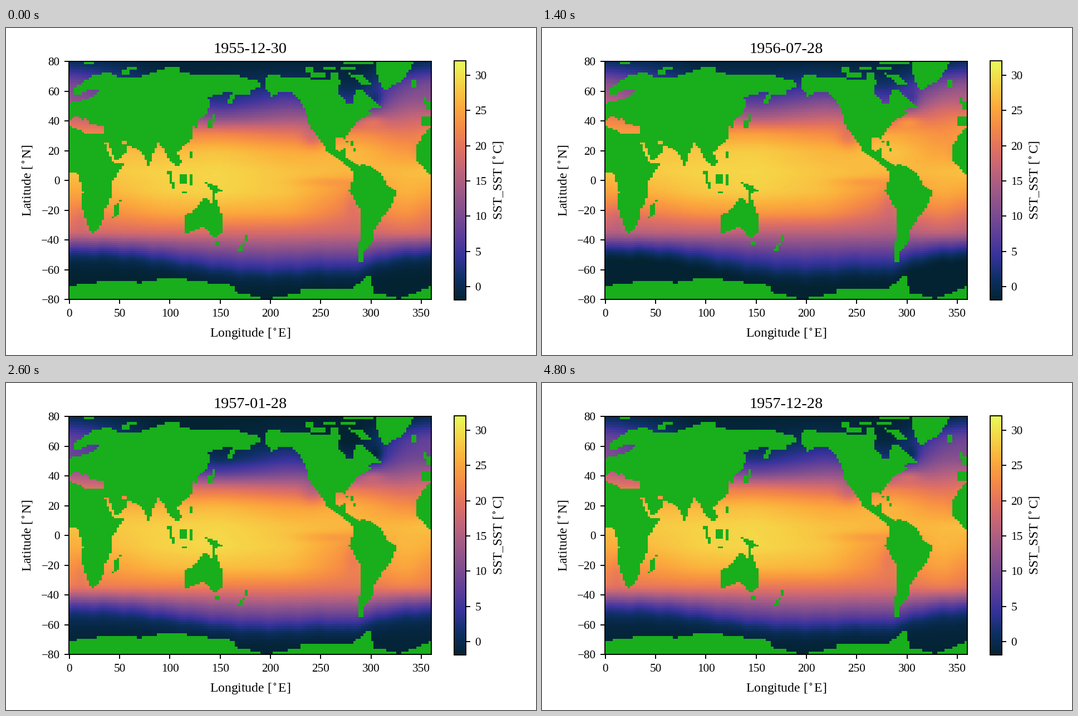
Animation of 952 by 588 pixels, one loop 5000 ms. Source, as a matplotlib script:

```python
import numpy as np
import matplotlib.pyplot as plt
from matplotlib.animation import FuncAnimation
from matplotlib.colors import LinearSegmentedColormap
from matplotlib.path import Path

W, H, DPI = 952, 588, 170
FRAMES, INTERVAL = 25, 200
NX, NY = 144, 120

plt.rcParams.update({
    "font.family": "Liberation Serif", "mathtext.fontset": "stix",
    "font.size": 10, "xtick.labelsize": 9, "ytick.labelsize": 9,
})

THERMAL = ["#032333", "#0d3064", "#35329b", "#5d3e99", "#7e4d8f", "#9e5987",
           "#c16479", "#e17161", "#f68b45", "#fbad3c", "#f6d346", "#e7fa5a"]
cmap = LinearSegmentedColormap.from_list("thermal", THERMAL, 256)
cmap.set_bad("#19ae1c")

# Grid: rows are finer at the equator than at the poles
s = np.linspace(-1, 1, NY + 1)
lon_edges = np.linspace(-0.5, 360, NX + 1)
lat_edges = 80 * (0.8 * s + 0.2 * s**3)
lon = (lon_edges[1:] + lon_edges[:-1]) / 2
lat = (lat_edges[1:] + lat_edges[:-1]) / 2
LON, LAT = np.meshgrid(lon, lat)
STAGE = np.c_[113.9 + 1.806 * LON.ravel(), 274.25 - 2.675 * LAT.ravel()]
land = np.zeros(LON.shape, bool)


def paint(*outline, value=True):
    """Mark the cells inside an outline given in stage pixels."""
    path = Path(np.reshape(outline, (-1, 2)))
    land[path.contains_points(STAGE).reshape(land.shape)] = value


def island(x, y, w, h):
    paint(x, y, x + w, y, x + w, y + h, x, y + h)


def draw_continents():
    # Northern Eurasia
    paint(113, 138, 123, 131, 123, 108, 143, 95, 160, 84, 186, 80, 208, 91,
          228, 91, 264, 80, 290, 70, 312, 70, 312, 78, 352, 86, 410, 84,
          457, 97, 457, 104, 440, 112, 437, 119, 414, 121, 402, 140, 397, 131,
          408, 113, 362, 124, 368, 134, 360, 155, 344, 168, 113, 168)
    # Southern Asia
    paint(113, 160, 344, 166, 345, 179, 340, 182, 333, 171, 333, 200,
          307, 224, 316, 240, 307, 251, 290, 232, 281, 214, 273, 207, 262, 228,
          258, 253, 246, 226, 240, 220, 219, 211, 215, 225, 195, 241, 176, 206,
          113, 190)
    # Africa, both sides of the seam
    paint(113, 172, 177, 186, 178, 207, 193, 243, 213, 244, 190, 277, 187, 312,
          179, 322, 173, 350, 160, 367, 152, 368, 135, 320, 138, 295, 130, 262,
          113, 260)
    paint(766, 176, 750, 192, 735, 215, 735, 233, 757, 261, 766, 262)
    # Australia, New Guinea, Madagascar
    paint(320, 369, 320, 338, 333, 332, 356, 306, 365, 309, 372, 322, 375, 304,
          391, 343, 386, 373, 372, 375, 355, 357, 336, 365)
    paint(358, 278, 378, 283, 387, 293, 373, 300, 373, 319, 369, 292)
    paint(192, 341, 193, 322, 206, 310, 201, 338)
    # North America
    paint(464, 97, 470, 85, 497, 87, 603, 96, 594, 112, 614, 137, 621, 138,
          625, 122, 631, 109, 642, 112, 672, 142, 650, 147, 657, 154, 633, 167,
          610, 195, 614, 207, 605, 198, 591, 198, 591, 216, 602, 222, 604, 216,
          611, 216, 609, 230, 632, 248, 622, 256, 595, 233, 577, 222, 557, 190,
          548, 184, 539, 150, 520, 118, 497, 114, 478, 123, 464, 105)
    # South America
    paint(622, 250, 645, 245, 674, 262, 686, 285, 702, 292, 692, 322, 676, 340,
          660, 366, 660, 380, 640, 408, 643, 421, 631, 421, 638, 355, 636, 326,
          617, 293, 623, 272)
    # Greenland, Baffin Island
    paint(664, 59, 668, 95, 683, 116, 690, 105, 712, 94, 736, 59)
    paint(612, 81, 640, 85, 658, 101, 645, 104)
    # Antarctica
    paint(112, 492, 112, 464, 193, 453, 240, 458, 296, 449, 410, 463, 410, 474,
          465, 488, 528, 477, 530, 470, 618, 470, 655, 443, 659, 476, 708, 487,
          766, 464, 766, 492)


def draw_inland_seas():
    paint(112, 167, 126, 156, 140, 167, 144, 158, 151, 174, 178, 176, 178, 191,
          148, 191, 112, 176, value=False)
    paint(123, 122, 146, 112, 167, 112, 150, 127, 123, 132, value=False)
    paint(177, 207, 184, 207, 196, 238, 212, 240, 193, 243, value=False)
    paint(206, 202, 218, 202, 218, 208, 206, 208, value=False)


def draw_islands():
    # Europe
    island(748, 160, 18, 17)
    island(729, 95, 10, 11)
    island(750, 122, 5, 13)
    island(756, 130, 9, 17)
    island(141, 61, 17, 6)
    island(207, 77, 13, 7)
    island(216, 68, 20, 6)
    # Japan and the Philippines
    island(371, 154, 5, 14)
    island(360, 167, 9, 14)
    island(330, 223, 5, 11)
    # Indonesia
    paint(290, 258, 296, 258, 304, 290, 297, 284)
    island(312, 264, 12, 17)
    island(330, 264, 6, 20)
    island(316, 294, 8, 4)
    # Tasmania and New Zealand
    island(376, 384, 8, 5)
    island(430, 371, 6, 13)
    paint(424, 386, 430, 386, 422, 402, 416, 400)
    # Caribbean
    island(620, 204, 5, 7)
    island(625, 217, 5, 6)
    # Canadian Arctic
    island(605, 60, 54, 5)
    island(540, 71, 10, 11)
    island(549, 79, 26, 9)
    island(570, 69, 20, 6)
    island(584, 79, 13, 13)
    island(600, 69, 28, 6)


def smooth(a, n, axis, mode):
    kernel = np.hanning(n + 2)[1:-1]
    kernel /= kernel.sum()
    pad = [(0, 0), (0, 0)]
    pad[axis] = (n // 2, n // 2)
    return np.apply_along_axis(np.convolve, axis, np.pad(a, pad, mode=mode),
                               kernel, "valid")


def bump(x, y, w, h, change):
    return change * np.exp(-((LON - x) / w)**2 - ((LAT - y) / h)**2)


# Yearly mean temperature: a profile from south to north for some longitudes
KNOT_LAT = [-35, -22, -8, 6, 20, 32, 42, 52, 65, 80]
PROFILES = {
    0: [18.3, 21, 25, 27.5, 27, 22, 18, 12.5, 10.5, 0],
    90: [19, 25, 28.3, 28.8, 27, 21.5, 13, 7, 0, -1.8],
    150: [18.5, 25.5, 29, 29.2, 27.5, 22, 10.5, 3.5, 0, -1.8],
    220: [18.5, 25, 27.5, 27.5, 25.5, 20, 13.5, 8, 1.5, -1.8],
    285: [17.5, 20, 22.5, 26.5, 27, 23, 12, 3, -1, -1.8],
    335: [19.5, 24, 26.5, 27, 23.5, 20.5, 17, 13, 8, -1.5],
}


def build_mean():
    rows = [np.interp(lon, list(PROFILES), r, period=360)
            for r in zip(*PROFILES.values())]
    rows = smooth(np.array(rows), 15, 1, "wrap")
    # Latitude of the 3 degree isotherm around Antarctica
    front = (-54.5 + 6.3 * np.cos(np.radians(lon - 20))
             - 4 * np.exp(-((lon - 282) / 22)**2)
             + 0.5 * np.sin(lon / 4.7) + 0.3 * np.sin(lon / 2.3))
    field = np.empty(LON.shape)
    for i, f in enumerate(front):
        width = -35 - f
        knots = [-80, f - 12, f - 5, f, f + width / 4, f + width / 2]
        temps = [-1.8, -1.8, -0.4, 3, 6.5, 10.5]
        field[:, i] = np.interp(lat, knots + KNOT_LAT, temps + list(rows[:, i]))
    field = smooth(smooth(field, 7, 0, "edge"), 3, 1, "wrap")
    field += bump(255, -1, 32, 3, -1.6)    # equatorial cold tongue
    field += bump(282, -15, 8, 9, -1.5)    # Peru
    field += bump(12, -25, 6, 10, -1.2)    # Benguela
    field += bump(243, 29, 12, 8, -4)      # California
    field += bump(300, 40, 14, 4, 4)       # Gulf Stream
    field += bump(305, 54, 7, 6, -4)       # Labrador
    field += bump(345, 20, 6, 8, -1.5)     # Canaries
    return field


draw_continents()
draw_inland_seas()
draw_islands()
mean = build_mean()
swing = (4.9 * np.exp(-((LAT - 46) / 22)**2)
         - 2.6 * np.exp(-((LAT + 38) / 24)**2))
peak_month = 7.9 + 0.4 * np.tanh(LAT / 15)


def temperature(k):
    season = np.cos(2 * np.pi * (k - peak_month) / 12) if k else 0
    return np.ma.array(np.maximum(mean + swing * season, -1.8), mask=land)


def date(k):
    return f"{1955 + (k + 11) // 12}-{k % 12 or 12:02d}-{30 if k < 2 else 28}"


fig = plt.figure(figsize=(5.6001, 3.4591), dpi=DPI, facecolor="white")


def axes(left, top, right, bottom):
    return fig.add_axes([left / W, 1 - bottom / H,
                         (right - left) / W, (bottom - top) / H])


def label(x, baseline, text, size=10, rotation=0):
    return fig.text(x / W, 1 - baseline / H, text, size=size, ha="center",
                    va="baseline", rotation=rotation, rotation_mode="anchor")


ax = axes(113, 60.25, 764, 488.25)
mesh = ax.pcolormesh(lon_edges, lat_edges, temperature(0), cmap=cmap,
                     vmin=-1.9, vmax=32)
ax.set(xlim=(-0.5, 360), ylim=(-80, 80),
       xticks=range(0, 351, 50), yticks=range(-80, 81, 20))
bar = fig.colorbar(mesh, cax=axes(804.5, 59.5, 826, 489))
bar.set_ticks(range(0, 31, 5))

title = label(438.5, 45, date(0), 12)
label(438.5, 555, r"Longitude [$^\circ$E]")
label(44, 274, r"Latitude [$^\circ$N]", rotation=90)
label(890, 274, r"SST_SST [$^\circ$C]", rotation=90)


def update(k):
    mesh.set_array(temperature(k))
    title.set_text(date(k))
    return mesh, title


anim = FuncAnimation(fig, update, frames=FRAMES, interval=INTERVAL,
                     repeat=True, repeat_delay=0, blit=False)
plt.show()
```
